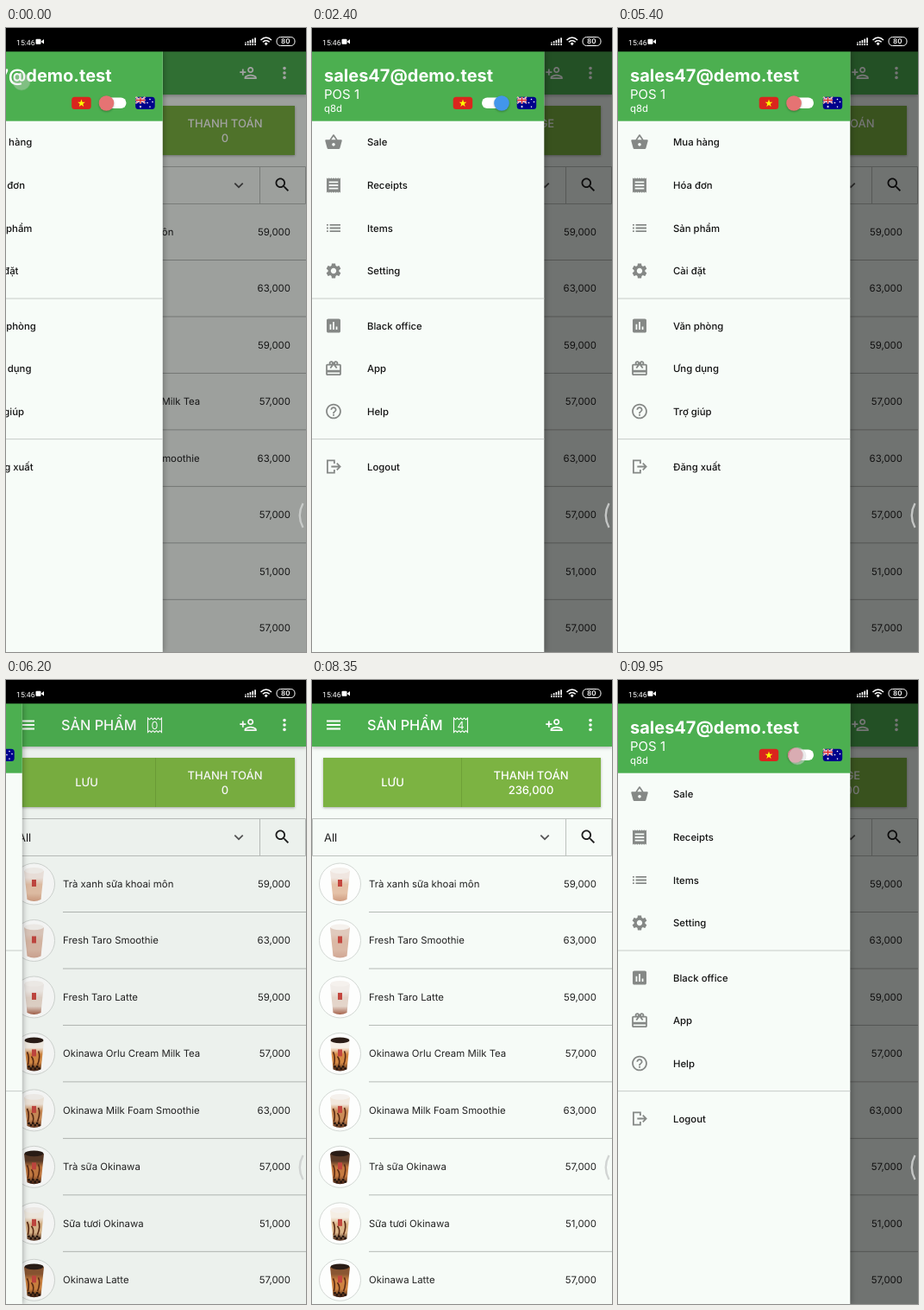
An HTML page for the animation above (10000 ms loop, 348 by 722 pixels).

```html
<!DOCTYPE html>
<html lang="vi">
<head>
<meta charset="utf-8">
<title>POS menu</title>
<style>
html, body { margin: 0; width: 100%; height: 100%; overflow: hidden; background: #f6fbf7; }
svg { display: block; width: 348px; height: 722px; font-family: Inter, Roboto, sans-serif; text-rendering: geometricPrecision; }
#bar { filter: drop-shadow(0 1.5px 2px rgba(0,0,0,.3)); }
#pay { filter: drop-shadow(0 1px 1.5px rgba(0,0,0,.3)); }
#drawer { filter: drop-shadow(1px 0 3px rgba(0,0,0,.3)); }
#thumb { filter: drop-shadow(0 1px 1px rgba(0,0,0,.3)); }
</style>
</head>
<body>
<svg id="stage" viewBox="0 0 348 722"></svg>
<script>
const LOOP = 10000, DRAWER = 269.3;
const ICONS = {
  basket: 'M17.21 9l-4.38-6.56c-.19-.28-.51-.42-.83-.42s-.64.14-.83.43L6.79 9H2c-.55 0-1 .45-1 1 0 .09.01.18.04.27l2.54 9.27c.23.84 1 1.46 1.92 1.46h13c.92 0 1.69-.62 1.93-1.46l2.54-9.27L23 10c0-.55-.45-1-1-1h-4.79zM9 9l3-4.4L15 9H9zm3 8c-1.1 0-2-.9-2-2s.9-2 2-2 2 .9 2 2-.9 2-2 2z',
  receipt: 'M18 17H6v-2h12v2zm0-4H6v-2h12v2zm0-4H6V7h12v2zM3 22l1.5-1.5L6 22l1.5-1.5L9 22l1.5-1.5L12 22l1.5-1.5L15 22l1.5-1.5L18 22l1.5-1.5L21 22V2l-1.5 1.5L18 2l-1.5 1.5L15 2l-1.5 1.5L12 2l-1.5 1.5L9 2 7.5 3.5 6 2 4.5 3.5 3 2v20z',
  list: 'M3 13h2v-2H3v2zm0 4h2v-2H3v2zm0-8h2V7H3v2zm4 4h14v-2H7v2zm0 4h14v-2H7v2zM7 7v2h14V7H7z',
  gear: 'M19.14 12.94c.04-.3.06-.61.06-.94 0-.32-.02-.64-.07-.94l2.03-1.58c.18-.14.23-.41.12-.61l-1.92-3.32c-.12-.22-.37-.29-.59-.22l-2.39.96c-.5-.38-1.03-.7-1.62-.94l-.36-2.54c-.04-.24-.24-.41-.48-.41h-3.84c-.24 0-.43.17-.47.41l-.36 2.54c-.59.24-1.13.57-1.62.94l-2.39-.96c-.22-.08-.47 0-.59.22L2.74 8.87c-.12.21-.08.47.12.61l2.03 1.58c-.05.3-.09.63-.09.94s.02.64.07.94l-2.03 1.58c-.18.14-.23.41-.12.61l1.92 3.32c.12.22.37.29.59.22l2.39-.96c.5.38 1.03.7 1.62.94l.36 2.54c.05.24.24.41.48.41h3.84c.24 0 .44-.17.47-.41l.36-2.54c.59-.24 1.13-.56 1.62-.94l2.39.96c.22.08.47 0 .59-.22l1.92-3.32c.12-.22.07-.47-.12-.61l-2.01-1.58zM12 15.6c-1.98 0-3.6-1.62-3.6-3.6s1.62-3.6 3.6-3.6 3.6 1.62 3.6 3.6-1.62 3.6-3.6 3.6z',
  chart: 'M19 3H5c-1.1 0-2 .9-2 2v14c0 1.1.9 2 2 2h14c1.1 0 2-.9 2-2V5c0-1.1-.9-2-2-2zM9 17H7v-7h2v7zm4 0h-2V7h2v10zm4 0h-2v-4h2v4z',
  gift: 'M20 6h-2.18c.11-.31.18-.65.18-1 0-1.66-1.34-3-3-3-1.05 0-1.96.54-2.5 1.35l-.5.67-.5-.68C10.96 2.54 10.05 2 9 2 7.34 2 6 3.34 6 5c0 .35.07.69.18 1H4c-1.11 0-1.99.89-1.99 2L2 19c0 1.11.89 2 2 2h16c1.11 0 2-.89 2-2V8c0-1.11-.89-2-2-2zm-5-2c.55 0 1 .45 1 1s-.45 1-1 1-1-.45-1-1 .45-1 1-1zM9 4c.55 0 1 .45 1 1s-.45 1-1 1-1-.45-1-1 .45-1 1-1zm11 15H4v-2h16v2zm0-5H4V8h5.08L7 10.83 8.62 12 11 8.76l1-1.36 1 1.36L15.38 12 17 10.83 14.92 8H20v6z',
  help: 'M11 18h2v-2h-2v2zm1-16C6.48 2 2 6.48 2 12s4.48 10 10 10 10-4.48 10-10S17.52 2 12 2zm0 18c-4.41 0-8-3.59-8-8s3.59-8 8-8 8 3.59 8 8-3.59 8-8 8zm0-14c-2.21 0-4 1.79-4 4h2c0-1.1.9-2 2-2s2 .9 2 2c0 2-3 1.75-3 5h2c0-2.25 3-2.5 3-5 0-2.21-1.79-4-4-4z',
  logout: 'M4 3h10v5h-2V5H5v14h7v-3h2v5H3V3zM9 11h9.2l-2.6-2.6L17 7l5 5-5 5-1.4-1.4 2.6-2.6H9z',
  addPerson: 'M15 12c2.21 0 4-1.79 4-4s-1.79-4-4-4-4 1.79-4 4 1.79 4 4 4zm0-6c1.1 0 2 .9 2 2s-.9 2-2 2-2-.9-2-2 .9-2 2-2zm0 8c-2.67 0-8 1.34-8 4v2h16v-2c0-2.66-5.33-4-8-4zm-6 4c.22-.72 3.31-2 6-2 2.7 0 5.8 1.29 6 2H9zm-3-3v-3h3v-2H6V7H4v3H1v2h3v3h2z',
  search: 'M15.5 14h-.79l-.28-.27C15.41 12.59 16 11.11 16 9.5 16 5.91 13.09 3 9.5 3S3 5.91 3 9.5 5.91 16 9.5 16c1.61 0 3.09-.59 4.23-1.57l.27.28v.79l5 4.99L20.49 19l-4.99-5zm-6 0C7.01 14 5 11.99 5 9.5S7.01 5 9.5 5 14 7.01 14 9.5 11.99 14 9.5 14z',
  down: 'M7.41 8.59L12 13.17l4.59-4.58L18 10l-6 6-6-6z'
};

// icon, centre y, Vietnamese, English
const MENU = [
  ['basket', 132, 'Mua hàng', 'Sale'], ['receipt', 182, 'Hóa đơn', 'Receipts'],
  ['list', 231.5, 'Sản phẩm', 'Items'], ['gear', 281, 'Cài đặt', 'Setting'],
  ['chart', 344.5, 'Văn phòng', 'Black office'], ['gift', 394, 'Ưng dụng', 'App'],
  ['help', 443.5, 'Trợ giúp', 'Help'], ['logout', 507.5, 'Đăng xuất', 'Logout']
];
// name, price in thousands, cup colours from top to bottom, pearls on top
const DRINKS = [
  ['Trà xanh sữa khoai môn', 59, '#f0e6e0 #e5c2a8 #cf9c80'],
  ['Fresh Taro Smoothie', 63, '#e0cabd #dbb9a6 #d0a693'],
  ['Fresh Taro Latte', 59, '#f1ece8 #e4d5ca #a5624b'],
  ['Okinawa Orlu Cream Milk Tea', 57, '#f6efe6 #d58a45 #3b1d12', 1],
  ['Okinawa Milk Foam Smoothie', 63, '#f2e8dd #cc8d58 #6a3c24'],
  ['Trà sữa Okinawa', 57, '#5a3a28 #c57a40 #3a1c12', 1],
  ['Sữa tươi Okinawa', 51, '#f5eee4 #dcb68a #4a2a1a'],
  ['Okinawa Latte', 57, '#8a5632 #cf8340 #3a1c12', 1]
];
const rowY = i => 236 + 65.47 * i;

const OPEN = [[-103, 1], [6007, 0], [9000, 1]];
const TOGGLES = [1650, 2600, 3510, 4600, 9885];
const ORDERS = [[6950, 0], [7300, 1], [7700, 5], [8100, 7]];
const TAPS = [[-103, 18, 62], [9000, 18, 62],
  ...TOGGLES.map(at => [at, 208, 88]),
  ...ORDERS.map(([at, i]) => [at, 200, rowY(i) + 6])];

const text = (x, y, s, size, attrs = '') => `<text x="${x}" y="${y}" font-size="${size}" ${attrs}>${s}</text>`;
const rect = (x, y, w, h, fill, attrs = '') => `<rect x="${x}" y="${y}" width="${w}" height="${h}" fill="${fill}" ${attrs}/>`;
const circle = (x, y, r, fill, attrs = '') => `<circle cx="${x}" cy="${y}" r="${r}" fill="${fill}" ${attrs}/>`;
const line = (d, color, width = 1) => `<path d="${d}" fill="none" stroke="${color}" stroke-width="${width}"/>`;
const icon = (name, x, y, fill) =>
  `<path d="${ICONS[name]}" fill="${fill}" fill-rule="evenodd" transform="translate(${x - 10.63} ${y - 10.63}) scale(.886)"/>`;
const repeat = (n, fn) => Array.from({ length: n }, (_, i) => fn(i)).join('');
const MID = 'text-anchor="middle"';

function star(x, y, r, fill) {
  const points = Array.from({ length: 10 }, (_, i) => {
    const a = i * Math.PI / 5, d = i % 2 ? r * .4 : r;
    return [x + d * Math.sin(a), y - d * Math.cos(a)].map(v => v.toFixed(2));
  });
  return `<polygon points="${points.join(' ')}" fill="${fill}"/>`;
}

function cup(i) {
  const [, , tones, pearls] = DRINKS[i], [top, mid, low] = tones.split(' ');
  const syrup = i > 2;
  return `<linearGradient id="cup${i}" x2="0" y2="1"><stop stop-color="${top}"/><stop offset=".28" stop-color="${top}"/>
    <stop offset=".48" stop-color="${mid}"/><stop offset=".75" stop-color="${mid}"/><stop offset="1" stop-color="${low}"/></linearGradient>
    <g transform="translate(32.5 ${rowY(i)})">${circle(0, 0, 24, '#fdfefd', 'stroke="#d3d8d4"')}
    <path d="M-11.5-15Q0-20 11.5-15L8 18Q0 22-8 18Z" fill="url(#cup${i})"/>
    ${syrup ? line('M-8-2Q-5 4-7 13M-3 3Q1 8-2 15M5-3Q8 3 4 13', '#5a2a14', 1.6) : ''}
    <ellipse cy="-15.5" rx="11" ry="3.4" fill="${pearls ? '#2a1c16' : '#f5f1ed'}"/>
    ${syrup ? repeat(6, k => circle(-6 + k * 2.4, 15 + k % 2 * 2.2, 1.4, '#24150f')) : ''}
    ${rect(-2.5, -5, 5, 8, '#c4473f')}</g>`;
}

function page() {
  return rect(0, 27, 348, 695, '#f6fbf7') +
    rect(0, 27, 348, 50, '#4caf50', 'id="bar"') +
    line('M17 47.5h16M17 52h16M17 56.5h16', '#fff', 1.8) +
    text(64, 58, 'SẢN PHẨM', 16.3, 'fill="#fff" font-weight="500"') +
    line('M164.5 44' + 'l2 1.8 2-1.8'.repeat(4) + 'v16.5' + 'l-2-1.8-2 1.8'.repeat(4) + 'z', '#fff', 1.1) +
    text(172.5, 56.7, '', 12.5, `id="count" fill="#fff" ${MID}`) +
    icon('addPerson', 281, 52, '#fff') +
    repeat(3, i => circle(323, 46.6 + i * 5.4, 1.8, '#fff')) +
    rect(13, 90, 322, 57, '#7cb342', 'id="pay"') + line('M173.5 90v57', '#6ea038') +
    `<g fill="#fff" font-weight="500" ${MID}>` + text(93.5, 123, 'LƯU', 13) +
    text(254, 114.5, '', 13, 'id="charge"') + text(254, 131.5, '', 13, 'id="total"') + '</g>' +
    line('M.5 160.5h347v43h-347zM294.5 160v43', '#bcc1bd') +
    text(14, 186.5, 'All', 13, 'fill="#1c1c1c"') +
    icon('down', 270, 182, '#555') + icon('search', 320.5, 181.5, '#1c1c1c') +
    repeat(DRINKS.length, i => cup(i) + `<g fill="#222">` +
      text(66, rowY(i) + 4, DRINKS[i][0], 11.4) +
      text(330, rowY(i) + 4, DRINKS[i][1] + ',000', 11.4, 'text-anchor="end"') + '</g>' +
      line(`M66 ${rowY(i) + 32.5}h282`, '#b5bab6'));
}

function drawer() {
  const jack = 'M238 80l11 7M249 80l-11 7';
  return `<g id="drawer">` + rect(0, 27, DRAWER, 695, '#f7fcf8') + rect(0, 27, DRAWER, 80.7, '#4caf50') +
    '<g fill="#fff">' + text(14, 61.5, 'sales47@demo.test', 20, 'font-weight="700"') +
    text(14, 82, 'POS 1', 15) + text(14, 97, 'q8d', 11.4) + '</g>' +
    rect(163.7, 79.8, 22.5, 14.2, '#da251d', 'rx="3.5"') + star(175, 87.2, 4.6, '#ff0') +
    rect(237.7, 79.8, 22.5, 14.2, '#00008b', 'rx="3.5"') +
    line(jack, '#fff', 1.6) + line(jack, '#d33', .6) +
    line('M243.5 80v7.5M238 83.5h11', '#fff', 2.4) + line('M243.5 80v7.5M238 83.5h11', '#d22', 1.3) +
    [[243.5, 91, 1.7], [254.5, 82.5, 1.2], [251.5, 86.5, 1.2], [257.5, 85.5, 1.2], [254.5, 91.2, 1.2]]
      .map(s => star(...s, '#fff')).join('') +
    rect(197, 80.5, 30, 12.5, '#fff', 'rx="6.25"') + circle(0, 87, 8.8, '#e57373', 'id="thumb"') +
    line(`M0 313h${DRAWER}M0 475.7h${DRAWER}`, '#c6cbc7') +
    MENU.map(([name, y]) => icon(name, 25, y, '#858886') +
      text(64, y + 4, '', 11.35, 'class="item" fill="#141414" font-weight="500"')).join('') + '</g>';
}

function statusBar() {
  return rect(0, 0, 348, 27.3, '#000') + '<g fill="#fff">' +
    text(12, 19.5, '15:46', 8.7, 'font-family="Roboto, sans-serif"') +
    rect(34.5, 12.8, 6, 6, '#fff', 'rx="1"') + '<path d="M40.5 15.7l3.5-2.7v5.5z"/>' +
    repeat(5, i => rect(277 + i * 2.8, 16.5 - i * 1.3, 1.7, 1 + i * 1.3, '#fff') + rect(277 + i * 2.8, 18.3, 1.7, 1.7, '#fff')) +
    line('M295.5 14Q301.7 8 308 14M297.8 16.3Q301.7 12.6 305.7 16.3', '#fff', 1.5) +
    '<path d="M299.7 18l2-1.6 2 1.6-2 2.2z"/>' +
    rect(314, 10.5, 21, 10, 'none', 'rx="4.5" stroke="#fff"') +
    text(324.3, 18.4, '80', 8, `font-weight="600" ${MID}`) + '</g>';
}

const $ = id => document.getElementById(id);
$('stage').innerHTML = page() + rect(0, 27, 348, 695, '#000', 'id="scrim"') + drawer() + statusBar() +
  line('M344.5 550Q337 564 344.5 578', 'rgba(205,207,206,.9)', 2.4) +
  circle(0, 0, 10, '#e0dde0', 'id="dot" stroke="#bbb" stroke-opacity=".5"');
const items = document.querySelectorAll('.item');

const clamp = v => Math.min(1, Math.max(0, v));
const mix = (a, b, p) => a + (b - a) * p;

// Critically damped spring
function openness(t) {
  const [start, target] = OPEN.filter(([at]) => at <= t).pop();
  const w = .02236 * (t - start), left = (1 + w) * Math.exp(-w);
  return target ? 1 - left : left;
}

function draw(t) {
  const u = openness(t);
  $('drawer').setAttribute('transform', `translate(${(u - 1) * DRAWER})`);
  $('drawer').style.display = u < .002 ? 'none' : '';
  $('scrim').setAttribute('opacity', .54 * u);

  const flips = TOGGLES.filter(at => at <= t), english = flips.length % 2;
  const p = flips.length ? clamp((t - flips[flips.length - 1]) / 200) ** 2 : 1;
  const on = english ? p : 1 - p;
  $('thumb').setAttribute('cx', mix(204, 220, on));
  $('thumb').setAttribute('fill', `rgb(${mix(229, 66, on)},${mix(115, 150, on)},${mix(115, 235, on)})`);
  items.forEach((el, i) => el.textContent = MENU[i][2 + english]);

  const ordered = ORDERS.filter(([at]) => at <= t);
  const sum = ordered.reduce((s, [, i]) => s + DRINKS[i][1], 0);
  $('count').textContent = ordered.length;
  $('charge').textContent = english ? 'CHARGE' : 'THANH TOÁN';
  $('total').textContent = sum ? sum + ',000' : '0';

  const tap = TAPS.find(([at]) => t > at - 80 && t < at + 180);
  $('dot').setAttribute('opacity', tap ? .55 * clamp((tap[0] + 180 - t) / 120) : 0);
  if (tap) $('dot').setAttribute('transform', `translate(${tap[1]} ${tap[2]})`);
}

function frame() {
  draw(performance.now() % LOOP);
  requestAnimationFrame(frame);
}
frame();
</script>
</body>
</html>
```
